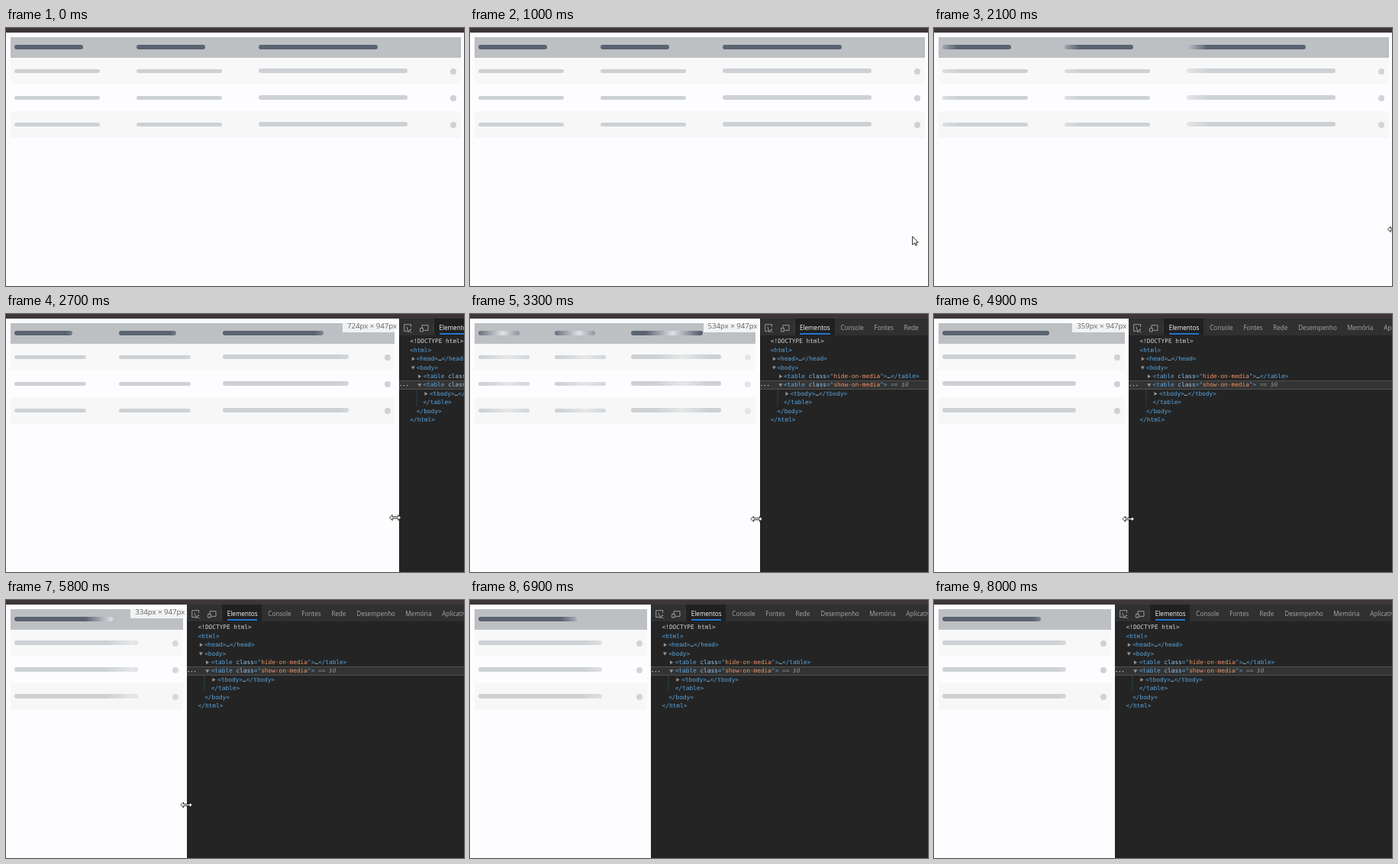
An HTML page that plays this animation: 600x338 px, repeating every 8100 ms.

```html
<!DOCTYPE html>
<html lang="pt">
<head>
<meta charset="utf-8">
<style>
html, body { margin: 0; width: 100%; height: 100%; overflow: hidden; background: #fdfcfe; }
div, pre, svg { position: absolute; }
#stage { inset: 0; overflow: hidden; contain: strict; }
#top { left: 0; top: 0; width: 600px; height: 5.6px; background: #3c3638; }
#table { left: 5.8px; top: 0; width: var(--w); height: 144px; }
.row { left: 0; width: 100%; }
.bar, .dot {
  --shine: rgba(255, 255, 255, .48);
  height: 5.7px; border-radius: 3px; background: #cdd1d4 no-repeat;
  background-image: linear-gradient(90deg, rgba(255,255,255,0), var(--shine), rgba(255,255,255,0));
  background-size: 71px 100%;
  background-position: calc(var(--e) * 100% - 71px + var(--e) * 142px) 0;
}
.head { --shine: rgba(255, 255, 255, .8); background-color: #5a6371; }
.dot { right: 5.5px; width: 8.4px; height: 8.4px; border-radius: 50%; background-color: #cfd2d5; }
#size {
  top: 8px; width: 73px; height: 16px; box-sizing: border-box; padding-right: 2px;
  background: rgba(255, 255, 255, .8); color: #666; text-align: right; white-space: nowrap;
  font: 9.65px/16px "Open Sans", sans-serif;
}
#tools { top: 5.6px; width: 620px; height: 333px; background: #242424; overflow: hidden; }
#tabs { left: 0; top: 0; width: 100%; height: 22.4px; background: #303030; }
#tabs div { top: 5.4px; color: #a8a8a8; font: 8.1px/14px "Open Sans", sans-serif; white-space: nowrap; }
#tabs .on { color: #fff; }
#line { left: 52.5px; top: 19.7px; width: 39.5px; height: 1.5px; background: #2474d0; }
#picked { left: 0; top: 81.4px; width: 100%; height: 11.6px; box-sizing: border-box;
  background: #343434; border: solid #505050; border-width: .8px 0; }
pre { margin: 0; left: 14.3px; top: 24.9px; color: #5ba6de; tab-size: 8.54px;
  font: 7.78px/11.39px "DejaVu Sans Mono", monospace; }
pre i { font-style: normal; color: #9bc6ea; }
pre b { font-weight: normal; color: #ee9468; }
pre u { text-decoration: none; color: #d4d4d4; }
pre em { color: #8c8c8c; }
svg { left: 0; top: 0; width: 600px; height: 338px; overflow: hidden; }
</style>
</head>
<body>
<div id="stage">
  <div id="table"></div>
  <div id="size"></div>
  <div id="tools">
    <div id="tabs"></div>
    <div id="line"></div>
    <div id="picked"></div>
    <svg fill="none" stroke="#a8a8a8" stroke-width=".9">
      <path d="M10.5 16.5H6.7V7.7H15.5V11M10 10.8L12 18L13.4 15.4L16.4 18.4M13.4 15.4L16 13.8Z"/>
      <path d="M30 13V8.7H38V15.4H32.5M27.6 12.6H31.4V17H27.6Z"/>
      <path d="M45 6V19" stroke="#484848" stroke-width=".8"/>
      <path d="M23 93V115" stroke="#2b4858" stroke-width=".8"/>
      <g fill="#939393" stroke="none">
        <path id="arrows"/>
        <path fill="#b8b8b8" d="M1.5 87h1.4v1.3h-1.4zM5.7 87h1.4v1.3h-1.4zM9.9 87h1.4v1.3h-1.4z"/>
      </g>
    </svg>
    <pre><u>&lt;!DOCTYPE html&gt;</u>
&lt;html&gt;
&#9;&lt;head&gt;<u>…</u>&lt;/head&gt;
&#9;&lt;body&gt;
&#9;&#9;&lt;table <i>class</i>="<b>hide-on-media</b>"&gt;<u>…</u>&lt;/table&gt;
&#9;&#9;&lt;table <i>class</i>="<b>show-on-media</b>"&gt;<em style="font-style:normal"> == </em><em>$0</em>
&#9;&#9;&#9;&lt;tbody&gt;<u>…</u>&lt;/tbody&gt;
&#9;&#9;&lt;/table&gt;
&#9;&lt;/body&gt;
&lt;/html&gt;</pre>
  </div>
  <div id="top"></div>
  <svg fill="#fff" stroke="#111" stroke-width=".9">
    <path id="pointer" d="M0 0V11L2.6 8.6L4.2 12L5.8 11.3L4.3 8H7.6Z"/>
    <path id="resize" d="M-7.5 0L-3.9 -3.6V-1.1H3.9V-3.6L7.5 0L3.9 3.6V1.1H-3.9V3.6Z"/>
  </svg>
</div>
<script>
const LOOP = 8100, SPLIT = 4275;
const $ = id => document.getElementById(id);

function add(parent, cls, style, text = '') {
  const el = document.createElement('div');
  el.className = cls;
  el.style.cssText = style;
  el.textContent = text;
  return parent.appendChild(el);
}

const table = $('table');
[[11.8, 27.5, '#bcc0c3'], [39.3, 34, '#f8f8f9'], [109, 34.7, '#f7f7f8']].forEach(([y, h, color]) =>
  add(table, 'row', `top:${y}px;height:${h}px;background:${color}`));

// Each cell: start and width as parts of the table, vertical shift of its row bars
function layout(cells) {
  const group = add(table, '', 'left:0;top:0;width:100%');
  for (const [start, part, dy] of cells)
    [25, 56.5, 91.5, 126.5].forEach((y, i) => add(group, i ? 'bar' : 'bar head',
      `left:calc(var(--w) * ${start} + 5.6px);top:${y - 2.8 + (i ? dy : 0)}px;` +
      `width:calc((var(--w) * ${part} - 11px) * ${i ? .75 : .6})`));
  return group;
}
const wide = layout([[0, .271, 0], [.271, .271, 0], [.542, .458, -.8]]);
const narrow = layout([[0, 1, -.6]]);
[57, 92, 127].forEach(y => add(table, 'dot', `top:${y - 4.2}px`));

add($('tabs'), '', 'left:46px;top:0;width:52px;height:22.4px;background:#202020');
[['Elementos', 52.5], ['Console', 106], ['Fontes', 150], ['Rede', 189], ['Desempenho', 222],
 ['Memória', 286], ['Aplicativos', 334]].forEach(([name, x], i) =>
  add($('tabs'), i ? '' : 'on', `left:${x}px`, name));

const right = 'l4.2 2.5l-4.2 2.5z', down = 'h5l-2.5 4.2z';
$('arrows').setAttribute('d', `M16.8 50.3${right}M15.8 62.6${down}M25 73.2${right}M24.3 85.3${down}M33.4 96${right}`);

// time, divider x, shown width, resize cursor x
const drag = [[2100, 601.5, 845, 602], [2300, 590, 829, 586], [2700, 515, 724, 510], [3000, 440, 618, 435],
  [3300, 379.5, 534, 375.5], [3700, 329, 465, 324], [4200, 290, 411, 284], [4500, 270, 381, 267],
  [4900, 255.2, 359, 254.6], [5300, 246, 346, 245], [5600, 239.5, 337, 238.5], [5800, 237.3, 334, 236.5]];
const walk = [[700, 550, 290], [900, 573, 278], [1200, 593, 263]];

function along(keys, t) {
  const n = keys.findIndex(k => k[0] > t);
  if (n < 0) return keys[keys.length - 1];
  if (!n) return keys[0];
  const a = keys[n - 1], b = keys[n], f = (t - a[0]) / (b[0] - a[0]);
  return a.map((v, i) => v + (b[i] - v) * f);
}

// cubic-bezier(.25, .1, .25, 1)
function ease(p) {
  let lo = 0, hi = 1, s;
  for (let i = 0; i < 20; i++) {
    s = (lo + hi) / 2;
    if (.75 * s * (1 - s) + s ** 3 < p) lo = s; else hi = s;
  }
  return .3 * s * (1 - s) ** 2 + 3 * s * s * (1 - s) + s ** 3;
}

function sweep(t) {
  if (t < SPLIT) return ease((t + 15) % 1000 / 1000);
  return t < 5285 ? 0 : ease((t - 5285) % 1000 / 1000);
}

function place(id, x, y, shown) {
  $(id).setAttribute('transform', `translate(${x} ${y})`);
  $(id).style.display = shown ? '' : 'none';
}

function draw(t) {
  const [, x, px, cx] = along(drag, t);
  const [, ax, ay] = along(walk, t);
  table.style.setProperty('--w', x - 11.4 + 'px');
  table.style.setProperty('--e', sweep(t));
  wide.style.display = t < SPLIT ? '' : 'none';
  narrow.style.display = t < SPLIT ? 'none' : '';
  $('tools').style.left = x + 'px';
  $('size').style.left = x - 74 + 'px';
  $('size').textContent = `${Math.round(px)}px × 947px`;
  $('size').style.display = t > 2100 && t < 6700 ? '' : 'none';
  place('pointer', ax, ay, t >= 700 && t < 1300);
  place('resize', cx, Math.min(268.5, 263.8 + Math.max(0, t - 2100) / 200), t >= 1300 && t < 6700);
}

const begin = performance.now();
function tick() {
  // ten pictures a second, like a screen recording
  draw(Math.floor((performance.now() - begin) % LOOP / 100) * 100);
  requestAnimationFrame(tick);
}
tick();
</script>
</body>
</html>
```
